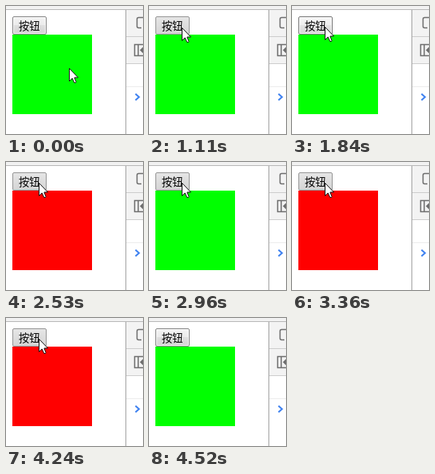
These frames come from a looping animation (172 by 161 pixels, 4830 ms). An HTML page:

```html
<!DOCTYPE html>
<html lang="zh">
<head>
<meta charset="utf-8">
<style>
html, body { margin: 0; width: 100%; height: 100%; overflow: hidden; background: #fff; }
svg { display: block; width: 172px; height: 161px; }
text { font: 13.333px "Noto Sans CJK SC", "Noto Sans CJK", sans-serif; }
</style>
</head>
<body>
<svg viewBox="0 0 172 161">
  <defs>
    <linearGradient id="normal" x2="0" y2="1">
      <stop stop-color="#f3f3f3"/><stop offset=".5" stop-color="#ebebeb"/>
      <stop offset=".5" stop-color="#dfdfdf"/><stop offset="1" stop-color="#d2d2d2"/>
    </linearGradient>
    <linearGradient id="hover" x2="0" y2="1">
      <stop stop-color="#f6f6f6"/><stop offset=".5" stop-color="#eeeeee"/>
      <stop offset=".5" stop-color="#e3e3e3"/><stop offset="1" stop-color="#d6d6d6"/>
    </linearGradient>
    <linearGradient id="pressed" x2="0" y2="1">
      <stop stop-color="#e6e6e6"/><stop offset="1" stop-color="#d4d4d4"/>
    </linearGradient>
  </defs>
  <rect width="172" height="161" fill="#fff"/>
  <rect width="172" height="4" fill="#f2f2f2"/>
  <rect y="4" width="172" height="1" fill="#b8b8b8"/>

  <!-- side panel -->
  <rect x="151" y="5" width="21" height="67" fill="#f3f3f3"/>
  <g fill="#cdcdcd">
    <rect x="150" y="5" width="1" height="156" fill="#a3a3a3"/>
    <rect x="151" y="38" width="21" height="1"/>
    <rect x="151" y="72" width="21" height="1"/>
    <rect x="151" y="101" width="21" height="1" fill="#ececec"/>
  </g>
  <g fill="none" stroke="#6e6e6e" stroke-width="1.5">
    <path d="M173 14.5H166.500Q164.500 14.500 164.500 16.500V25.500Q164.500 27.500 166.500 27.500H170"/>
    <path d="M173 48.500H161.500V62.500H173M166 48.500V62.500"/>
  </g>
  <path d="M172 51.500V59.500L168 55.500Z" fill="#6e6e6e"/>
  <path d="M162.500 110.500L167 114.500L162.500 118.500" fill="none" stroke="#3f82f0" stroke-width="2"/>

  <rect id="box" x="8" y="36" width="100" height="100"/>
  <rect id="button" x="8.5" y="13.5" width="42" height="22" rx="1.5"/>
  <rect id="shine" x="9.5" y="14.5" width="40" height="20" rx="1" fill="none" stroke="#fff" stroke-opacity=".75"/>
  <text x="16" y="30">按钮</text>
  <path id="cursor" d="M.5 .5V16.5L4.200 13L6.700 18.500H8.500L9 17.500L6.900 12H11.500Z" fill="#fff" stroke="#111" stroke-width="1"/>
</svg>
<script>
const LOOP = 4830;
const GREEN = "#00ff00", RED = "#ff0000";
const [box, button, shine, cursor] =
  ["box", "button", "shine", "cursor"].map(id => document.getElementById(id));

// [time, x, y]; no position hides the pointer
const moves = [
  [0, 79, 78], [130, 63, 63], [280, 52, 46], [430, 46, 36], [560, 42, 31],
  [680, 41, 29], [830, 41, 27], [1410, 41, 26], [4390, 100, 80], [4520]
];
// [mouse down, mouse up]; each release toggles the box
const clicks = [
  [1110, 1260], [1690, 1840], [2110, 2230], [2530, 2680],
  [2960, 3110], [3360, 3510], [3810, 4090], [4240, 4390]
];
const borders = { normal: "#858585", hover: "#777777", pressed: "#969696" };

function draw(t) {
  const [, x, y] = moves.filter(m => m[0] <= t).pop();
  const visible = x !== undefined;
  const over = visible && x < 51 && y < 36;
  const down = clicks.some(([a, b]) => t >= a && t < b);
  const count = clicks.filter(c => t >= c[1]).length;
  const state = down ? "pressed" : over ? "hover" : "normal";

  box.setAttribute("fill", count % 2 ? RED : GREEN);
  button.setAttribute("fill", `url(#${state})`);
  button.setAttribute("stroke", borders[state]);
  shine.setAttribute("visibility", down ? "hidden" : "visible");
  cursor.setAttribute("visibility", visible ? "visible" : "hidden");
  if (visible) cursor.setAttribute("transform", `translate(${x} ${y})`);
}

const start = performance.now();
function tick() {
  draw((performance.now() - start) % LOOP);
  requestAnimationFrame(tick);
}
tick();
</script>
</body>
</html>
```
